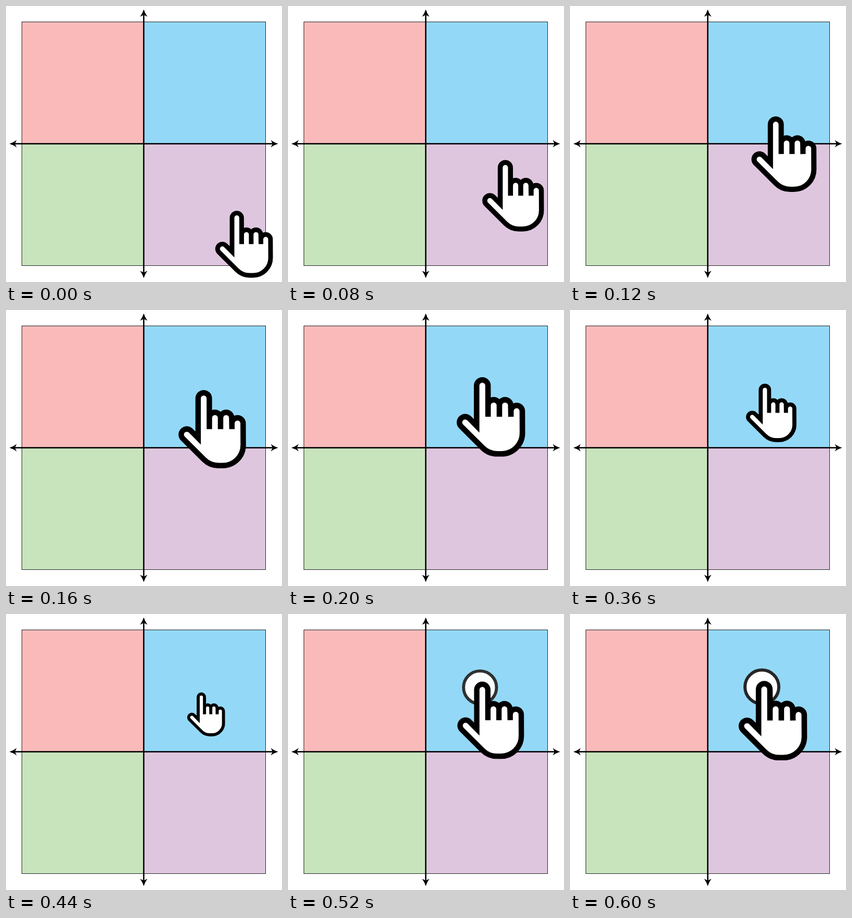
Recreate the animation shown at these times as an HTML page with a canvas. Size 530x530 px, loop 640 ms.

```html
<!DOCTYPE html>
<html lang="en">
<head>
<meta charset="utf-8">
<title>Tap in a quadrant</title>
<style>
  html, body { margin: 0; width: 100%; height: 100%; overflow: hidden; background: #fff; }
  canvas { display: block; }
</style>
</head>
<body>
<canvas id="stage" width="530" height="530"></canvas>
<script>
const ctx = document.getElementById('stage').getContext('2d');
const LOOP = 640, STEP = 40;
const MID = 264.5;
const START = { x: 447.2, y: 434.7, scale: 0.842 };
const TARGET = { x: 377.7, y: 177.8, scale: 1 };

const mix = (a, b, p) => a + (b - a) * p;
const easeOut = x => Math.sin(Math.PI / 2 * Math.max(0, Math.min(1, x)));

function drawAxis(angle) {
  ctx.save();
  ctx.translate(MID, MID);
  ctx.rotate(angle);
  ctx.fillStyle = '#000';
  ctx.fillRect(0, -1.3, 250, 2.6);
  ctx.beginPath();
  ctx.moveTo(258, 0);
  ctx.quadraticCurveTo(250, -2.5, 244, -7);
  ctx.lineTo(247.5, 0);
  ctx.lineTo(244, 7);
  ctx.quadraticCurveTo(250, 2.5, 258, 0);
  ctx.fill();
  ctx.restore();
}

function drawQuadrants() {
  ctx.fillStyle = '#fff';
  ctx.fillRect(0, 0, 530, 530);
  ['#fababa', '#93d9f7', '#c8e4bc', '#dfc6df'].forEach((color, i) => {
    ctx.fillStyle = color;
    ctx.fillRect(30.5 + (i % 2) * 234, 30.5 + (i >> 1) * 234, 234, 234);
  });
  ctx.strokeStyle = '#222';
  ctx.lineWidth = 1;
  ctx.strokeRect(30.5, 30.5, 468, 468);
  for (let i = 0; i < 4; i++) drawAxis(i * Math.PI / 2);
}

function drawRipple(alpha) {
  ctx.save();
  ctx.globalAlpha = alpha;
  ctx.beginPath();
  ctx.arc(368.5, 140, 32.5, 0, 2 * Math.PI);
  ctx.fillStyle = '#fff';
  ctx.fill();
  ctx.strokeStyle = '#262626';
  ctx.lineWidth = 6;
  ctx.stroke();
  ctx.restore();
}

function drawHand() {
  const r = 10.9, webY = 204.6, diag = r * Math.SQRT1_2;
  ctx.beginPath();
  ctx.moveTo(362.1, 222.1);
  ctx.arc(373, 144.7, r, Math.PI, 0);
  for (const [x, y] of [[394.9, 182.8], [416.7, 182.8], [438.9, 193.6]]) {
    ctx.lineTo(x - r, webY);
    ctx.arc(x, y, r, Math.PI, 0);
  }
  ctx.arcTo(450.2, 275.8, 410, 275.8, 40);
  ctx.arcTo(385.3, 275.8, 340 - diag, 215.3 + diag, 40);
  ctx.arc(340, 215.3, r, Math.PI * 0.75, Math.PI * 1.75);
  ctx.closePath();
  ctx.fillStyle = '#fff';
  ctx.fill();
  ctx.strokeStyle = '#000';
  ctx.lineWidth = 10.6;
  ctx.stroke();
}

function draw(time) {
  const k = Math.floor((time % LOOP) / STEP);
  const glide = easeOut((k - 1) * 0.24);
  const release = easeOut((k - 11) * 0.39);
  const press = Math.max(0, Math.min(1, (k - 5) / 6)) ** 1.3 * (1 - release);
  const scale = mix(START.scale, TARGET.scale, glide) - 0.447 * press;

  drawQuadrants();
  ctx.save();
  ctx.translate(mix(START.x, TARGET.x, glide), mix(START.y, TARGET.y, glide));
  ctx.scale(scale, scale);
  ctx.translate(-TARGET.x, -TARGET.y);
  if (release > 0) drawRipple(release);
  drawHand();
  ctx.restore();
}

const began = performance.now();
function tick() {
  draw(performance.now() - began);
  requestAnimationFrame(tick);
}
tick();
</script>
</body>
</html>
```
